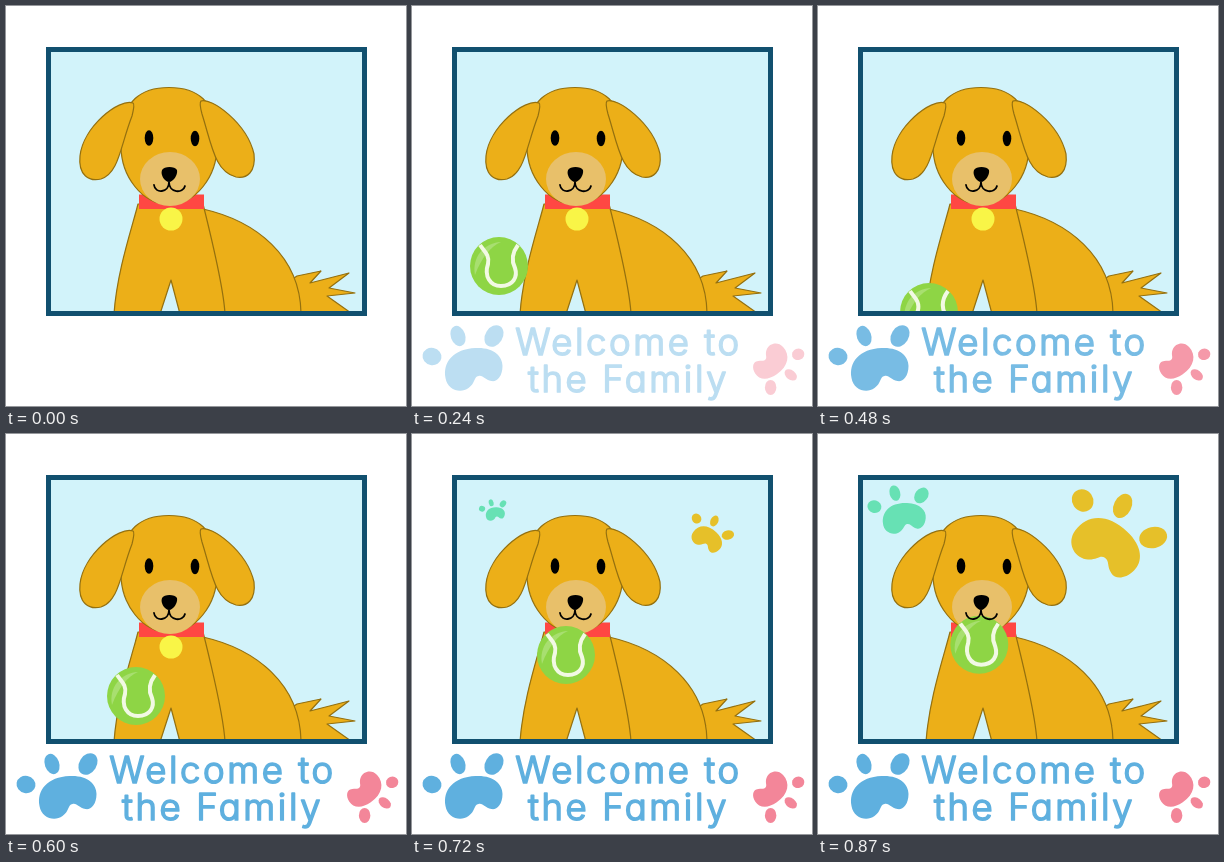
Recreate the animation shown at these times as an HTML page. Size 400 by 400 pixels, loop 0.9 s.

```html
<!DOCTYPE html>
<html lang="en">
<head>
<meta charset="utf-8">
<title>Welcome to the Family</title>
<style>
  html, body { margin: 0; width: 100%; height: 100%; overflow: hidden; background: #fff; }
  svg { display: block; width: 100vw; height: 100vh; }
  .fur { fill: #ecaf18; stroke: #94700f; stroke-width: 1.2; stroke-linejoin: round; }
  .blue { fill: #5fb0df; }
  .pink { fill: #f38699; }
  .teal { fill: #67e1b4; }
  .gold { fill: #e6c029; }
  text {
    font: 300 36.5px Inter, sans-serif;
    font-feature-settings: "cv11";
    letter-spacing: 2.6px;
    text-anchor: middle;
    fill: #5fb0df; stroke: #5fb0df; stroke-width: 1.7; stroke-linejoin: round;
  }
</style>
</head>
<body>
<svg viewBox="0 0 400 400">
  <defs>
    <clipPath id="window"><rect x="40" y="41" width="321" height="269"/></clipPath>
    <g id="paw">
      <path d="M-18 20C-21 4-10-9 12-10C30-11 39-2 39 8C39 19 33 24 28 23C21 22 20 17 15 18C10 19 12 25 5 30C-3 36-16 32-18 20Z"/>
      <ellipse rx="9.5" ry="8.6" transform="translate(-31.5 -1.500) rotate(10)"/>
      <ellipse rx="7.2" ry="10.5" transform="translate(-5.5 -22) rotate(-20)"/>
      <ellipse rx="8.7" ry="11.5" transform="translate(30.5 -22) rotate(32)"/>
    </g>
  </defs>

  <g clip-path="url(#window)">
    <rect x="40" y="41" width="321" height="269" fill="#d2f3fa"/>
    <g class="fur">
      <path d="M285 274L291 270L315 265L304 277L343 267L323 282L349 287L321 290L345 307H285Z"/>
      <path d="M197 203C250 215 294 250 295 307H210Z"/>
      <path d="M132 198C126 222 111 265 108 308H154L165 274L174 308H219C218 288 207 238 197 198Z"/>
    </g>
    <rect x="133" y="188.500" width="65" height="14.500" fill="#ff4743"/>
    <circle cx="165" cy="213" r="11.500" fill="#f9f547"/>
    <g class="fur">
      <path d="M115 140C113 92 138 81.500 163 81.500S213 92 211 140C211 170 190 198.500 163 198.500S115 170 115 140Z"/>
      <path d="M127 97C113 92 77 121 74 150C72 169 83 176 95 173C113 167 114 141 126 110Q129 98 127 97Z"/>
      <path d="M195 95C205 91 241 117 248 148C250 166 241 173 230 171C209 166 206 140 196 108Q193 97 195 95Z"/>
    </g>
    <ellipse cx="164" cy="173" rx="30" ry="27" fill="#e8c06a"/>
    <ellipse cx="143" cy="132" rx="4.300" ry="7.800"/>
    <ellipse cx="189" cy="132.500" rx="4.300" ry="7.800"/>

    <g id="ball">
      <circle r="29" fill="#8ed545"/>
      <path d="M-24 9C-27-8-16-23 2-24C-9-19-17-9-24 9Z" fill="#a8df70"/>
      <path d="M-19-21C-15-15-9-11-11-2C-15 10-9 20 2 20C14 20 19 11 16 2C12-6 13-13 19-21" fill="none" stroke="#f2f9e4" stroke-width="4"/>
    </g>

    <path d="M156 164C158 160 169 160 171 164C172 169 167 176 163 176C159 176 154 169 156 164Z"/>
    <path d="M148 179C149 188 163 187 163 176C163 187 177 188 179 180" fill="none" stroke="#000" stroke-width="1.800" stroke-linecap="round"/>
  </g>

  <g class="grow" data-at="81 76.5"><use href="#paw" class="teal" transform="translate(79.5 75.7) rotate(5) scale(.74)"/></g>
  <g class="grow" data-at="300.5 99"><use href="#paw" class="gold" transform="translate(290 95.4) rotate(46) scale(1.22)"/></g>

  <rect x="42.500" y="43.500" width="316" height="264" fill="none" stroke="#11506f" stroke-width="5"/>

  <g id="greeting">
    <use href="#paw" class="blue" transform="translate(51.5 352)"/>
    <use href="#paw" class="pink" transform="translate(368 358.5) rotate(148) scale(.66)"/>
    <text x="216.500" y="349">Welcome to</text>
    <text x="216.500" y="386">the Family</text>
  </g>
</svg>
<script>
  const LOOP = 900, STEP = 30;
  const ball = document.getElementById('ball');
  const greeting = document.getElementById('greeting');
  const prints = document.querySelectorAll('.grow');

  // time, x, y
  const path = [
    [0, 8, 160], [120, 51, 196], [240, 87, 260], [390, 104, 314], [480, 111, 306],
    [600, 130, 262], [720, 154, 221], [810, 161, 211], [900, 161, 211]
  ];

  function slope(i, k) {
    const a = path[Math.max(i - 1, 0)], b = path[Math.min(i + 1, path.length - 1)];
    return (b[k] - a[k]) / (b[0] - a[0]);
  }

  // Cubic Hermite curve through the path points
  function along(t, k) {
    let i = 0;
    while (i < path.length - 2 && t >= path[i + 1][0]) i++;
    const a = path[i], b = path[i + 1], d = b[0] - a[0], u = (t - a[0]) / d;
    const h = u * u * (3 - 2 * u);
    return a[k] + (b[k] - a[k]) * h
      + d * u * (1 - u) * ((1 - u) * slope(i, k) - u * slope(i + 1, k));
  }

  function draw(t) {
    ball.setAttribute('transform', `translate(${along(t, 1)} ${along(t, 2)})`);
    greeting.setAttribute('opacity', Math.min(t / 570, 1));
    const s = Math.max(0, (t - 600) / 270);
    for (const p of prints) {
      const [x, y] = p.dataset.at.split(' ');
      p.setAttribute('transform', `translate(${x} ${y}) scale(${s}) translate(${-x} ${-y})`);
    }
  }

  const start = performance.now();
  function tick(now) {
    const t = Math.max(0, now - start) % LOOP;
    draw(Math.floor(t / STEP) * STEP);
    requestAnimationFrame(tick);
  }
  draw(0);
  requestAnimationFrame(tick);
</script>
</body>
</html>
```
